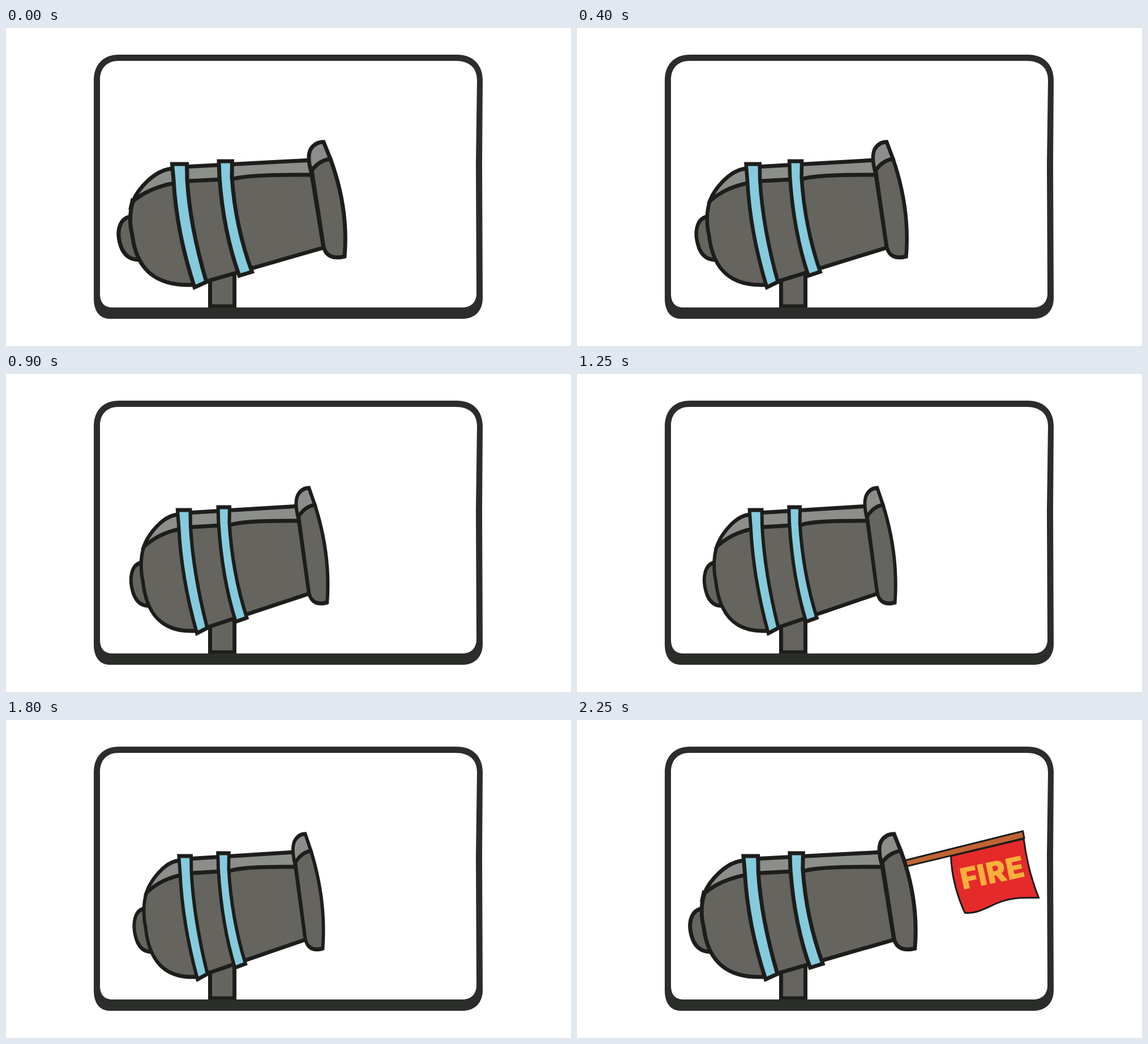
These frames come from a looping animation (998 by 561 pixels, 3 s). An HTML page:

```html
<!DOCTYPE html>
<html lang="en">
<head>
<meta charset="utf-8">
<title>Cannon</title>
<style>
html, body { margin: 0; width: 100%; height: 100%; overflow: hidden; background: #fff; }
svg { display: block; width: 100%; height: 100%; }
.iron { fill: #65645f; stroke: #1d1d1b; stroke-width: 7; }
.shine { fill: #8c8e8b; }
.band { fill: #85cbdd; }
.cloth { fill: #e52a2a; stroke: #1d1d1b; stroke-width: 3; }
.pole { fill: #c06433; }
text { font: 900 52px Inter, "Liberation Sans", sans-serif; letter-spacing: .6px; fill: #f9b03b; }
</style>
</head>
<body>
<svg viewBox="0 0 998 561">
  <path class="iron" d="M360.500 430H403.500V491H360.500Z"/>

  <g id="flag">
    <path class="cloth" d="M660.500 240L789 209.500C793 240 800 275 815.500 313.500C785 313 765 313 740 324C720 333 702 343 685 340C675 318 662 285 660.500 240Z"/>
    <path class="cloth pole" d="M570 250L787.500 196L790 208.500L570 261Z"/>
    <text transform="translate(681.500 299.500) rotate(-12)">FIRE</text>
  </g>

  <g id="cannon">
    <path class="iron" d="M224 332C198 334 194 362 204 388C211 404 222 409 237 409Z"/>
    <path id="spike" fill="#1d1d1b" d="M216 321L221 299L228 310Z"/>
    <path class="iron shine" d="M225 304C233 285 261 251 293 248L322 244.500L540 233V262L322 275Z"/>
    <path class="iron" d="M225 305C217 325 219 350 223 365C230 424 262 457 333 453L561 387.500L540 259Q430 258 402 266L322 270Q260 276 225 305Z"/>
    <path class="iron band" d="M293.500 240H319.500L320 268Q325 350 354 448L333 457.500Q301 360 296 268Z"/>
    <path class="iron band" d="M376 235H399.500L399 263Q405 350 434.500 430L412 437Q384 360 377 263Z"/>
    <path class="iron shine" d="M540 257Q531 228 538 214Q546 201 561 201L573 231Q556 236 540 257Z"/>
    <path class="iron" d="M540 251Q554 233 573 231C593 285 603 345 598 403C579 408 565 403 561 386Z"/>
  </g>

  <path fill="#2b2d2a" fill-rule="evenodd" d="M155 93C155 64 172 47 200 47H796C824 47 842 64 842 92L841 240L842 477C842 499 828 513 806 513H184C164 513 155 498 155 477Z
    M166 92V468C166 484 173 493 188 493H806C822 493 831 483 831 468L830 240L832 92C832 70 818 58 794 58H199C178 58 166 71 166 92Z"/>
</svg>
<script>
const LOOP = 3000, STEP = 50, PIVOT = 365;
const [cannon, flag, spike] = ["cannon", "flag", "spike"].map(id => document.getElementById(id));

// Slow squash with an ease-out, then a sudden release.
function squash(t) {
  if (t >= 2200) return 0.995;
  const left = Math.max(0, 1 - t / 1630);
  return 1 - 0.165 * (1 - left * left);
}

function draw(now) {
  const t = Math.floor(now % LOOP / STEP) * STEP;
  const s = squash(t);
  cannon.setAttribute("transform", `translate(${PIVOT * (1 - s)} 0) scale(${s} 1)`);
  spike.style.display = s > 0.98 ? "" : "none";

  // The flag shoots out, widening until it is fully extended.
  const k = Math.max(0, (2250 - t) / 100);
  const w = 1 - 0.11 * k;
  flag.style.display = t >= 2100 ? "" : "none";
  flag.setAttribute("transform", `translate(${816 * (1 - w) - 166 * k} ${32.5 * k}) scale(${w} 1)`);
}

let start;
function tick(now) {
  start ??= now;
  draw(now - start);
  requestAnimationFrame(tick);
}
draw(0);
requestAnimationFrame(tick);
</script>
</body>
</html>
```
